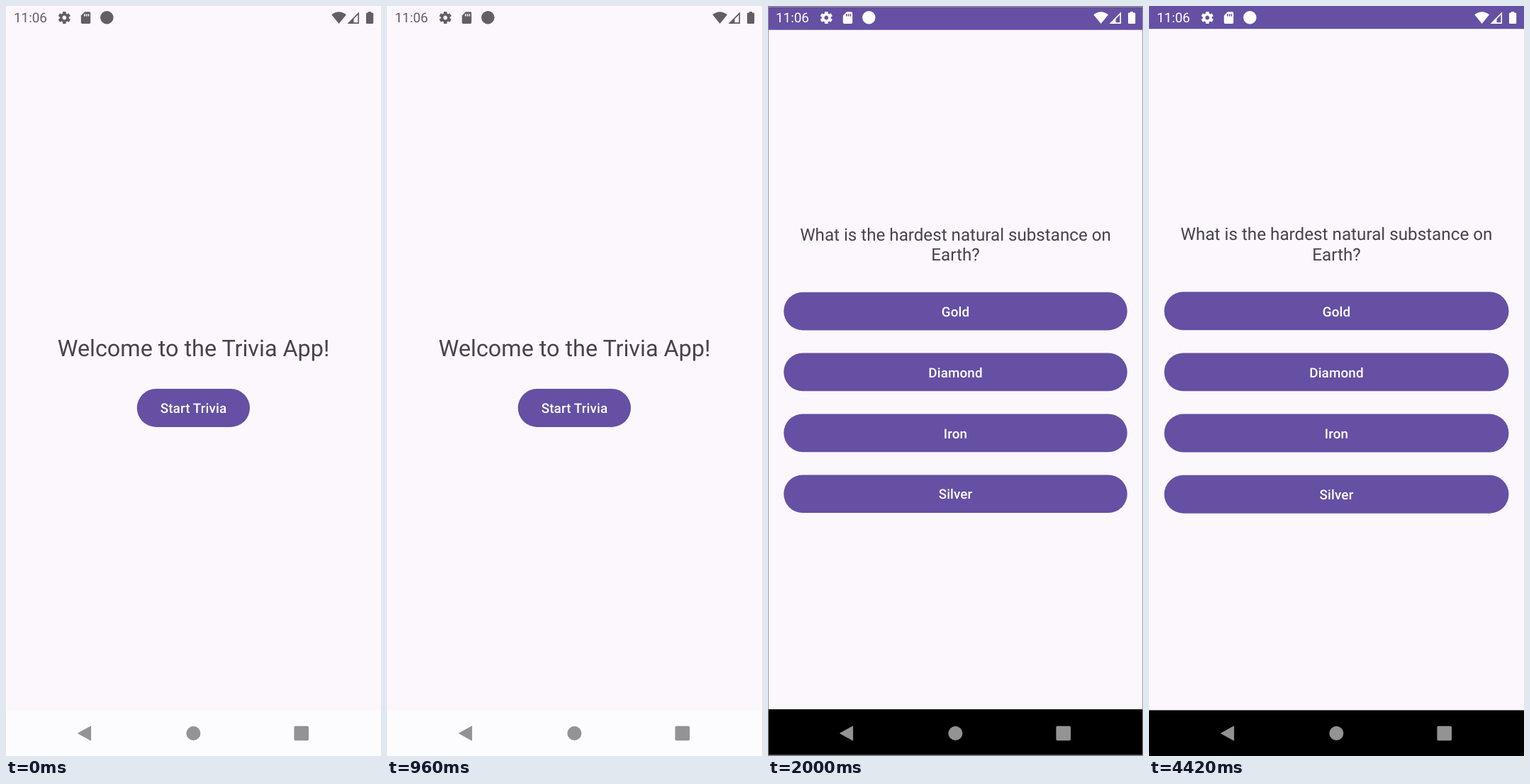
An HTML page that plays this animation: 529x1058 px, repeating every 4460 ms.

```html
<!DOCTYPE html>
<html lang="en">
<head>
<meta charset="utf-8">
<title>Trivia App</title>
<style>
  html, body { margin: 0; width: 100%; height: 100%; overflow: hidden; background: #000; }
  svg { display: block; font-family: Roboto, sans-serif; text-rendering: geometricPrecision; }
  .page { transform-origin: 264.5px 529px; }
  .surface { fill: #fcf7fd; }
  .primary { fill: #6550a4; }
  .copy { fill: #47434b; text-anchor: middle; }
  .label { fill: #fff; text-anchor: middle; font-size: 18.86px; font-weight: 500; letter-spacing: .0071em; }
</style>
</head>
<body>
<svg width="529" height="1058" viewBox="0 0 529 1058">
  <defs>
    <clipPath id="pill"><rect x="184.7" y="540" width="159.3" height="53.9" rx="26.95"/></clipPath>
  </defs>

  <g id="welcome" class="page">
    <rect class="surface" width="529" height="1058"/>
    <rect y="993.4" width="529" height="64.6" fill="#fcfbfd"/>
    <text class="copy" x="264.5" y="493.6" font-size="32.33">Welcome to the Trivia App!</text>
    <g clip-path="url(#pill)">
      <rect class="primary" x="184" y="539" width="161" height="56"/>
      <circle id="ripple" cx="264.5" cy="567" fill="#fff"/>
    </g>
    <text class="label" x="264.5" y="573.8">Start Trivia</text>
  </g>
  <rect id="shade" width="529" height="1058"/>

  <g id="quiz" class="page">
    <rect class="surface" width="529" height="1058"/>
    <rect class="primary" width="529" height="32.3"/>
    <rect y="993.4" width="529" height="64.6"/>
    <g class="copy" font-size="24.24">
      <text x="264.5" y="330.3">What is the hardest natural substance on</text>
      <text x="264.5" y="358.7">Earth?</text>
    </g>
    <g id="answers"></g>
  </g>

  <g id="status">
    <text x="11" y="23.3" font-size="18.86">11:06</text>
    <g transform="translate(82.3 16.5)" fill="none" stroke="currentColor">
      <circle r="4.7" stroke-width="3.6"/>
      <path id="tooth" d="M0-8.6V-5M0 8.6V5" stroke-width="4.6"/>
      <use href="#tooth" transform="rotate(60)"/>
      <use href="#tooth" transform="rotate(120)"/>
    </g>
    <path fill-rule="evenodd" d="M111 8.3H117.5Q119.2 8.3 119.2 10V23.3Q119.2 25 117.5 25H107.5Q105.8 25 105.8 23.3V13.5Z
      M110 11.3V14.5H111.6V11.3ZM112.8 11.3V14.5H114.4V11.3ZM115.6 11.3V14.5H117.2V11.3Z"/>
    <circle cx="142.3" cy="16.3" r="9.2"/>
    <path d="M459.3 12.2Q469.6 4.4 480 12.2L469.6 25Z"/>
    <path d="M483.6 24.2H497.2V10.4Z" fill="none" stroke="currentColor" stroke-width="1.7"/>
    <path d="M482 25L490.5 16.5V25Z"/>
    <path d="M511 8H515V9.6H517Q518.2 9.6 518.2 10.8V23.8Q518.2 25 517 25H509.2Q508 25 508 23.8V10.8Q508 9.6 509.2 9.6H511Z"/>
  </g>
  <g fill="#939295">
    <path d="M101.6 1026L119.6 1016V1036Z" stroke="#939295" stroke-linejoin="round"/>
    <circle cx="264.4" cy="1026" r="10"/>
    <rect x="406.4" y="1015.8" width="20.6" height="20.4" rx="2"/>
  </g>
</svg>

<script>
const LOOP = 4460, PRESS = 1360, RELEASE = 1640, OPEN = 1740, OPEN_TIME = 400;
const [welcome, ripple, shade, quiz, answers, status] =
  ['welcome', 'ripple', 'shade', 'quiz', 'answers', 'status'].map(id => document.getElementById(id));

answers.innerHTML = ['Gold', 'Diamond', 'Iron', 'Silver'].map((name, i) => {
  const y = 403.3 + i * 86.15;
  return `<rect class="primary" x="21.5" y="${y}" width="486" height="53.9" rx="26.95"/>
    <text class="label" x="264.5" y="${y + 34.2}">${name}</text>`;
}).join('');

const ramp = (t, start, length) => Math.min(1, Math.max(0, (t - start) / length));
const mix = (a, b, k) => a + (b - a) * k;
const cubic = (p, u) => {
  const v = 1 - u;
  return v * v * v * p[0] + 3 * v * v * u * p[1] + 3 * v * u * u * p[2] + u * u * u * p[3];
};

// Two-part curve: quick start, very slow finish.
function emphasized(x) {
  const [xs, ys] = x < 1 / 6
    ? [[0, .05, .1333, 1 / 6], [0, 0, .06, .4]]
    : [[1 / 6, .2083, .25, 1], [.4, .82, 1, 1]];
  let lo = 0, hi = 1;
  for (let i = 0; i < 24; i++) {
    const mid = (lo + hi) / 2;
    if (cubic(xs, mid) < x) lo = mid; else hi = mid;
  }
  return cubic(ys, lo);
}

function render(t) {
  const spread = 1 - (1 - ramp(t, PRESS, 210)) ** 2;
  ripple.setAttribute('r', mix(20, 86, spread));
  ripple.setAttribute('opacity', .28 * ramp(t, PRESS, 75) * (1 - ramp(t, RELEASE, 150)));

  const open = emphasized(ramp(t, OPEN, OPEN_TIME));
  welcome.style.transform = `scale(${mix(1, 1.15, open)})`;
  quiz.style.transform = `scale(${mix(.85, 1, open)})`;
  quiz.setAttribute('opacity', ramp(t, OPEN + 35, 50));
  shade.setAttribute('opacity', .5 * open);

  const tint = ramp(t, OPEN, 120);
  const color = `rgb(${[98, 94, 101].map(c => mix(c, 255, tint))})`;
  status.style.color = status.style.fill = color;
}

function tick() {
  render(performance.now() % LOOP);
  requestAnimationFrame(tick);
}
tick();
</script>
</body>
</html>
```
